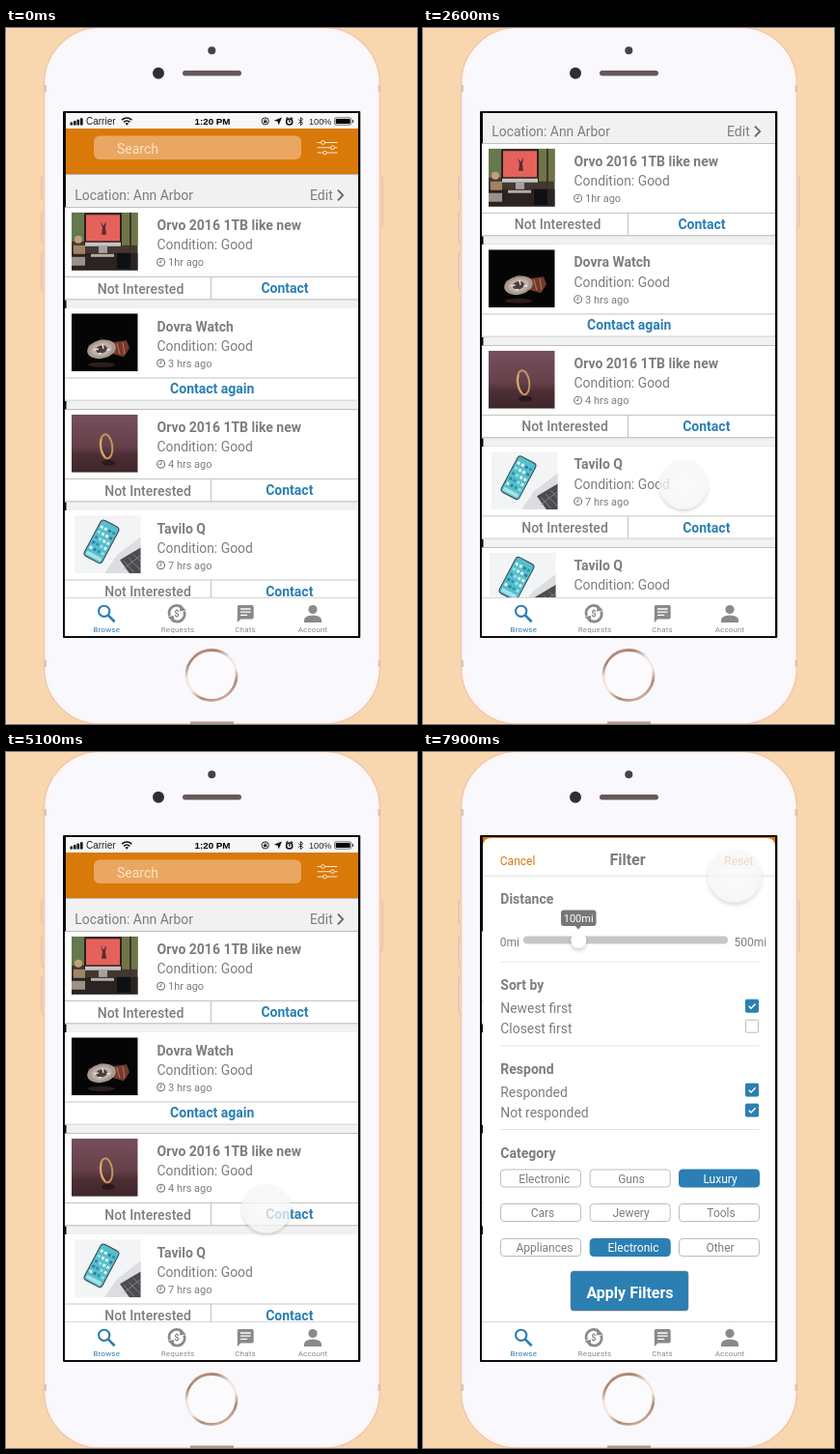
Animation of 426 by 720 pixels, one loop 8000 ms. Source, as an HTML page:

```html
<!DOCTYPE html>
<html lang="en">
<head>
<meta charset="utf-8">
<title>Marketplace app</title>
<style>
html, body { margin: 0; width: 100%; height: 100%; overflow: hidden; background: #f8d7ae; }
svg { display: block; width: 100vw; height: 100vh; font-family: Roboto, sans-serif; }
</style>
</head>
<body>
<svg id="stage" viewBox="0 0 426 720"></svg>
<script>
const GRAY = '#7d7d7d', BLUE = '#2b7fb3', ORANGE = '#d9790a', LINE = '#c3c3c3';
const SCROLL = 309, PITCH = 104.5;

// Markup helpers
const rect = (x, y, w, h, fill, extra = '') =>
  `<rect x="${x}" y="${y}" width="${w}" height="${h}" fill="${fill}" ${extra}/>`;
const circle = (x, y, r, fill, extra = '') =>
  `<circle cx="${x}" cy="${y}" r="${r}" fill="${fill}" ${extra}/>`;
const path = (d, stroke, width = 1, extra = '') =>
  `<path d="${d}" fill="none" stroke="${stroke}" stroke-width="${width}" ${extra}/>`;
const shape = (d, fill, extra = '') => `<path d="${d}" fill="${fill}" ${extra}/>`;
const text = (x, y, s, size = 13.9, fill = GRAY, weight = 400, extra = '') =>
  `<text x="${x}" y="${y}" font-size="${size}" fill="${fill}" font-weight="${weight}" ${extra}>${s}</text>`;
const mid = (x, y, s, size, fill, weight, extra = '') =>
  text(x, y, s, size, fill, weight, 'text-anchor="middle" ' + extra);
const group = (x, y, body) => `<g transform="translate(${x} ${y})">${body}</g>`;

const defs = `<defs>
  <clipPath id="view"><rect x="61" y="88" width="304" height="541"/></clipPath>
  <clipPath id="thumb"><rect width="68.5" height="60"/></clipPath>
  <linearGradient id="ring" x1=".1" y1="0" x2=".6" y2="1">
    <stop offset="0" stop-color="#c09a88"/><stop offset=".2" stop-color="#a9826f"/>
    <stop offset=".4" stop-color="#f1e5df"/><stop offset=".65" stop-color="#f4ebe7"/>
    <stop offset=".85" stop-color="#ad8571"/><stop offset="1" stop-color="#c9a594"/>
  </linearGradient>
  <linearGradient id="mauve" x1="0" y1="0" x2="0" y2="1">
    <stop offset="0" stop-color="#75505c"/><stop offset=".55" stop-color="#664049"/>
    <stop offset=".7" stop-color="#4c2e34"/><stop offset="1" stop-color="#3d262a"/>
  </linearGradient>
  <radialGradient id="touch">
    <stop offset="0" stop-color="#fff" stop-opacity=".72"/>
    <stop offset=".8" stop-color="#fcfcfc" stop-opacity=".72"/>
    <stop offset="1" stop-color="#f7f7f7" stop-opacity=".78"/>
  </radialGradient>
  <filter id="soft" x="-30%" y="-30%" width="160%" height="160%">
    <feDropShadow dx="0" dy="2.5" stdDeviation="2" flood-color="#000" flood-opacity=".2"/>
  </filter>
</defs>`;

function phoneBody() {
  const side = (x, y, h) => rect(x, y, 5, h, '#f6d6c2', 'rx="1.5" stroke="#dfb299" stroke-width=".8"');
  const band = y => rect(39, y, 3, 7, '#e6c3b4') + rect(385.5, y, 3, 7, '#e6c3b4');
  return rect(0, 0, 426, 720, '#f8d7ae')
    + side(37, 153, 25) + side(37, 190, 32) + side(37, 232, 39) + side(385, 153, 53)
    + rect(39.7, -.5, 347.6, 720.5, '#f9f9fd', 'rx="58" stroke="#efc8b5" stroke-width="1.8"')
    + rect(42, 1.8, 343, 716, 'none', 'rx="55.5" stroke="#fef6f3" stroke-width="3"')
    + band(59) + band(654)
    + circle(213.3, 23.3, 4, '#4b4143') + circle(158, 46.7, 6, '#332c30')
    + rect(183, 44, 61, 5.4, '#67595a', 'rx="2.7"')
    + circle(213, 669.5, 26, '#fbfafd', 'stroke="url(#ring)" stroke-width="2.8"')
    + rect(191, 717.5, 45, 3, '#b59a8c')
    + rect(59, 86, 308.3, 545, '#0b0b0b', 'rx="1"');
}

// Thumbnails, 68.5 x 60
const thumbs = {
  desk: rect(0, 0, 69, 60, '#43382f') + rect(0, 0, 14, 30, '#66784d') + rect(52, 0, 17, 34, '#6f7548')
    + rect(60, 0, 2, 40, '#3d3428') + rect(0, 42, 69, 18, '#2a2322') + rect(13, 1, 39, 34, '#2a2022')
    + rect(15, 2.5, 35, 27, '#e4625a') + shape('M30 9l3 5 3-5-1 7 1 7h-5l1-7z', '#592d33')
    + rect(14, 31, 37, 4, '#c9c4c2') + rect(28, 35, 9, 7, '#a7a2a0') + rect(2, 34, 12, 9, '#a18365')
    + rect(20, 43, 24, 3, '#b7aaa2') + rect(47, 42, 14, 16, '#0f1013') + rect(0, 46, 14, 9, '#9a9188')
    + circle(7, 28, 4, '#c1a177'),
  watch: rect(0, 0, 69, 60, '#060506') + shape('M41 30l16-2 3 8-6 9-14-4z', '#713a2c')
    + path('M47 31l3 11M53 30l2 12', '#b06f55', 1.2) + shape('M17 33l14-7 6 3-16 16z', '#4a332f')
    + `<g transform="rotate(-12 31 37)"><ellipse cx="31" cy="37" rx="15" ry="9.5" fill="#a89890"/>`
    + `<ellipse cx="31" cy="37" rx="11" ry="7" fill="#bdb0a9"/><ellipse cx="31" cy="37" rx="6" ry="4" fill="#4b3f3d"/>`
    + path('M23 36h5M33 32v5M36 39h4M27 41h3', '#efe8e3', 1.4) + '</g>'
    + `<ellipse cx="31" cy="53" rx="14" ry="2.6" fill="#2b1e1b"/>`,
  ring: rect(0, 0, 69, 60, 'url(#mauve)')
    + `<ellipse cx="36" cy="33" rx="6.2" ry="12.5" fill="none" stroke="#c6925f" stroke-width="2" transform="rotate(-7 36 33)"/>`
    + path('M31 25q-2 12 4 19', '#f0c58b') + `<ellipse cx="38" cy="50" rx="7" ry="3" fill="#2d191b"/>`,
  phone: rect(0, 0, 69, 60, '#f3f4f5') + shape('M69 22L44 41l-13 19h38z', '#dcdddf')
    + shape('M69 33L47 46l10 14h12z', '#4c4b4f') + path('M51 47l11 12M56 44l13 13M61 40l8 8M51 55l18-14', '#8d9095', .8)
    + `<g transform="translate(28 27) rotate(28)">` + rect(-11, -21.5, 22, 43, '#35444f', 'rx="4"')
    + rect(-10, -20.5, 20, 41, '#55bfcc', 'rx="3"')
    + Array.from({ length: 20 }, (_, i) => rect(-8.4 + i % 4 * 4.6, -15 + Math.floor(i / 4) * 6, 3, 3,
        ['#eef8f8', '#2c7f9f', '#9be0e6', '#f2f5f4', '#348fab'][i * 3 % 5], 'rx=".8"')).join('')
    + rect(-8.5, 15, 17, 4, '#a9e1e6', 'rx="1"') + '</g>',
  room: rect(0, 0, 69, 60, '#f3f4f4') + rect(0, 50, 69, 10, '#e7e9e9') + rect(18, 19, 32.5, 31, '#e6e8e8')
    + rect(19.5, 20.7, 29.5, 26.8, '#070707') + rect(30, 50, 8, 5, '#d2d4d5') + rect(22, 55, 26, 2, '#fbfbfb')
    + path('M7 40Q5 20 12 11M8 40Q12 24 9 17M7 40Q3 28 5 22', '#93bf97', 1.5)
    + rect(3, 39, 9, 12, '#dce4dd', 'rx="2"') + rect(54, 50, 6, 6, '#d0d0d0')
};

const items = [
  ['Orvo 2016 1TB like new', '1hr ago', 'desk', 68],
  ['Dovra Watch', '3 hrs ago', 'watch', 68, 700],
  ['Orvo 2016 1TB like new', '4 hrs ago', 'ring', 68],
  ['Tavilo Q', '7 hrs ago', 'phone', 71],
  ['Tavilo Q', '10 hrs ago', 'phone', 69, 400],
  ['Dovra Watch', '11 hrs ago', 'watch', 71],
  ['Orvo 2016 1TB like new', '13 hrs ago', 'room', 71]
];

// "again" is the font weight of the single wide action, if there is one
function item([title, age, thumb, x, again], i) {
  const first = i === 0;
  const actions = again
    ? mid(213.7, 192.2, 'Contact again', 14, BLUE, again)
    : mid(first ? 139.5 : 147, 193, 'Not Interested', 14, GRAY, 500)
      + mid(first ? 289 : 293.8, 192.6, 'Contact', 14, BLUE, 700) + rect(212, 176, 1, 23, LINE);
  return group(0, 81.5 + i * PITCH,
    rect(61, 104, 304, 96, '#fff')
    + group(x, 109.3, `<g clip-path="url(#thumb)">${thumbs[thumb]}</g>`)
    + text(156.5, 127.5, title, 14, GRAY, 700) + text(156.5, 147.8, 'Condition: Good')
    + circle(160.6, 160.7, 3.9, 'none', `stroke="${GRAY}" stroke-width="1.2"`)
    + path('M160.8 158.2v2.9h-2.2', GRAY) + text(168, 164.8, age, 11)
    + rect(61, 175.5, 304, 1, LINE) + rect(61, 198.7, 304, 1, LINE) + actions
    + rect(62.5, 199.7, 303, 8.8, '#f1f1f1'));
}

function statusBar() {
  const face = 'font-family="Liberation Sans, sans-serif"';
  let bars = '';
  for (let i = 0; i < 4; i++) bars += rect(66.5 + i * 3.5, 97.5 - i * 1.4, 2.6, 3 + i * 1.4, '#111');
  return rect(62, 88, 303, 16.5, '#f7f7f8') + bars + text(83, 100, 'Carrier', 10, '#222', 400, face)
    + path('M120 95.2q5.2-4.4 10.4 0M122 97.3q3.2-2.6 6.4 0', '#111', 1.6) + shape('M123.4 98.7q1.8-1.2 3.6 0l-1.8 2z', '#111')
    + mid(214, 100, '1:20 PM', 9.8, '#000', 700, face)
    + circle(268.7, 96.4, 3.6, 'none', 'stroke="#222"') + rect(267, 95.8, 3.4, 2.4, '#222')
    + path('M267.8 96v-1.2q.9-1.3 1.8 0V96', '#222', .7)
    + shape('M286 92.5l-3.4 8-1-3.8-3.8-1z', '#111') + circle(293.7, 97, 3.1, 'none', 'stroke="#111" stroke-width="1.5"')
    + path('M290.2 94.2l2-1.8M297.2 94.2l-2-1.8M293.7 95v2h1.4', '#111', 1.1)
    + path('M303.2 94.6l4.6 4-2.3 2v-8l2.3 2-4.6 4', '#222', .9)
    + text(314, 100, '100%', 9.2, '#222', 400, face)
    + rect(340.5, 92.8, 17.5, 7.4, 'none', 'rx="1.6" stroke="#555" stroke-width=".8"')
    + rect(341.7, 94, 15.1, 5, '#050505', 'rx=".8"') + rect(358.9, 95, 1.3, 3, '#555');
}

function header() {
  const knob = (x, y) => circle(x, y, 1.9, ORANGE, 'stroke="#fbe8d0"');
  return rect(62, 104, 303, 47.3, ORANGE) + rect(91, 111.5, 215, 24.5, '#e9a761', 'rx="6"')
    + text(115, 129.5, 'Search', 14, '#fbe3c6')
    + path('M322.5 118.5h21M322.5 123.7h21M322.5 129h21', '#fbe8d0', 1.1)
    + knob(328.5, 118.5) + knob(338.5, 123.7) + knob(330.5, 129)
    + rect(62, 151.3, 303, 34.2, '#f1f1f1') + text(71.3, 178, 'Location: Ann Arbor') + text(315, 178, 'Edit', 14)
    + path('M344 167.6l5.2 5.4-5.2 5.4', '#686868', 1.9);
}

function tabBar() {
  const tab = (x, s, fill = '#8b8b8b') => mid(x, 625.4, s, 8, fill, 400, 'letter-spacing=".15"');
  const icon = '#8a8a8a';
  return rect(61, 589, 304, 40, '#fff') + rect(61, 589, 304, 1, '#d6d6d6')
    + circle(101.7, 603.3, 5.6, 'none', `stroke="${BLUE}" stroke-width="2.1"`) + path('M105.8 607.4l6.8 6.8', BLUE, 2.7)
    + path('M169.5 608a7.8 7.8 0 0 1 12.4-8.6M184.7 603.6a7.8 7.8 0 0 1-12.4 8.6', icon, 2.9)
    + shape('M180.4 596l6.2 6.6-6.4 1zM173.8 615.600l-6.200-6.600 6.400-1z', icon) + mid(177.1, 609.2, '$', 9.5, icon, 700)
    + shape('M241.5 597h13.4q1.8 0 1.8 1.7v11q0 1.7-1.8 1.7h-11.5l-3.6 3.6v-16.3q0-1.7 1.7-1.7z', icon)
    + path('M243 601h10.6M243 604.2h10.6M243 607.4h7.2', '#fff', 1.3)
    + circle(318, 601.5, 4.6, icon) + shape('M309 615v-2.5q0-4.7 9-5.1 9 .4 9 5.1v2.5z', icon)
    + tab(104.3, 'Browse', BLUE) + tab(178, 'Requests') + tab(248, 'Chats') + tab(318, 'Account');
}

function filterSheet() {
  const rule = y => rect(80, y, 269, 1, '#e4e4e4');
  const head = (y, s) => text(80.3, y, s, 14, GRAY, 700);
  const option = (y, s, on) => text(80.3, y, s)
    + rect(334.5, y - 13.6, 13, 13, on ? BLUE : '#fff', `rx="1" stroke="${on ? BLUE : '#b9b9b9'}"`)
    + (on ? path(`M337.7 ${y - 7}l2.3 2.4 4.6-4.8`, '#fff', 1.4) : '');
  const chip = (x, y, s, cx, on) =>
    rect(x + .5, y + .5, 83, 18, on ? BLUE : '#fff', `rx="3.5" stroke="${on ? BLUE : '#bdbdbd'}"`)
    + mid(cx, y + 14.2, s, 12, on ? '#fff' : GRAY);
  return shape('M62 600V98q0-9 9-9h285q9 0 9 9v502z', '#fff')
    + text(79.8, 117, 'Cancel', 12, ORANGE) + mid(212, 117, 'Filter', 16, GRAY, 700) + text(312.3, 117, 'Reset', 12, ORANGE)
    + rect(62, 127.5, 303, 1, '#dedede') + rect(62, 128.5, 303, 1, '#f3f3f3')
    + head(157, 'Distance') + rect(143, 163.5, 36.5, 16.5, '#777', 'rx="3"') + shape('M158 180h6l-3 3.5z', '#777')
    + mid(161.2, 176, '100mi', 11, '#fff') + text(79.8, 200.5, '0mi', 12) + text(322.5, 200.5, '500mi', 12)
    + rect(104, 190.5, 212, 8, '#c6c6c6', 'rx="4"') + circle(161.3, 194.8, 8, '#fff', 'filter="url(#soft)"')
    + rule(216.5) + head(246, 'Sort by') + option(269.8, 'Newest first', true) + option(290.8, 'Closest first', false)
    + rule(303.5) + head(333, 'Respond') + option(356.7, 'Responded', true) + option(377.7, 'Not responded', true)
    + rule(390) + head(420, 'Category')
    + chip(80, 431.5, 'Electronic', 125.8) + chip(172.7, 431.5, 'Guns', 216) + chip(265, 431.5, 'Luxury', 308, true)
    + chip(80, 467, 'Cars', 124) + chip(172.7, 467, 'Jewery', 215.5) + chip(265, 467, 'Tools', 309)
    + chip(80, 503, 'Appliances', 126) + chip(172.7, 503, 'Electronic', 218, true) + chip(265, 503, 'Other', 308)
    + rect(153, 537, 122, 41, BLUE, 'rx="3" stroke="#9a7a6d" stroke-width=".5"')
    + mid(214.5, 564.8, 'Apply Filters', 16, '#fff', 700);
}

const stage = document.getElementById('stage');
stage.innerHTML = defs + phoneBody()
  + `<g clip-path="url(#view)"><g id="list">${statusBar() + header() + items.map(item).join('')}</g>`
  + rect(62, 88, 303, 10, ORANGE, 'id="corners"')
  + `<g id="sheet">${filterSheet()}</g>${tabBar()}</g>`
  + `<g id="cursor"><g filter="url(#soft)">${circle(0, 0, 27.5, 'url(#touch)')}</g></g>`;
const [list, corners, sheet, cursor] = ['list', 'corners', 'sheet', 'cursor'].map(id => document.getElementById(id));

const span = (t, a, b) => Math.min(1, Math.max(0, (t - a) / (b - a)));
const easeOut = p => 1 - (1 - p) ** 3;
const easeBoth = p => p * p * (3 - 2 * p);
const mix = (a, b, p) => a + (b - a) * p;

// Cursor stops: x, y, scale
const OFF = [410, 760, 1], CONTACT = [270, 472, .93], FILTER = [335, 122, 1], NEXT = [323, 128, 1];

function cursorAt(t) {
  if (t < 5600) return [OFF, CONTACT, easeOut(span(t, 0, 900))];
  if (t < 7800) return [OFF, FILTER, easeOut(span(t, 5640, 6540))];
  return [FILTER, NEXT, span(t, 7800, 7900)];
}

function draw(t) {
  const scrolled = easeBoth(span(t, 2430, 3000)) - easeBoth(span(t, 4530, 5100));
  const open = easeBoth(span(t, 6830, 7400));
  const [from, to, p] = cursorAt(t);
  const [x, y, size] = from.map((v, i) => mix(v, to[i], p));
  const fade = t < 5600 ? 1 - span(t, 5100, 5300) : 1;
  list.setAttribute('transform', `translate(0 ${-SCROLL * scrolled})`);
  sheet.setAttribute('transform', `translate(0 ${mix(520, 0, open)})`);
  corners.setAttribute('opacity', open < 1 ? 0 : 1);
  cursor.setAttribute('transform', `translate(${x} ${y}) scale(${size})`);
  cursor.setAttribute('opacity', fade);
}

// Ten pictures per second
const start = performance.now();
function tick() {
  const t = (performance.now() - start) % 8000;
  draw(Math.floor(t / 100) * 100);
  requestAnimationFrame(tick);
}
tick();
</script>
</body>
</html>
```
